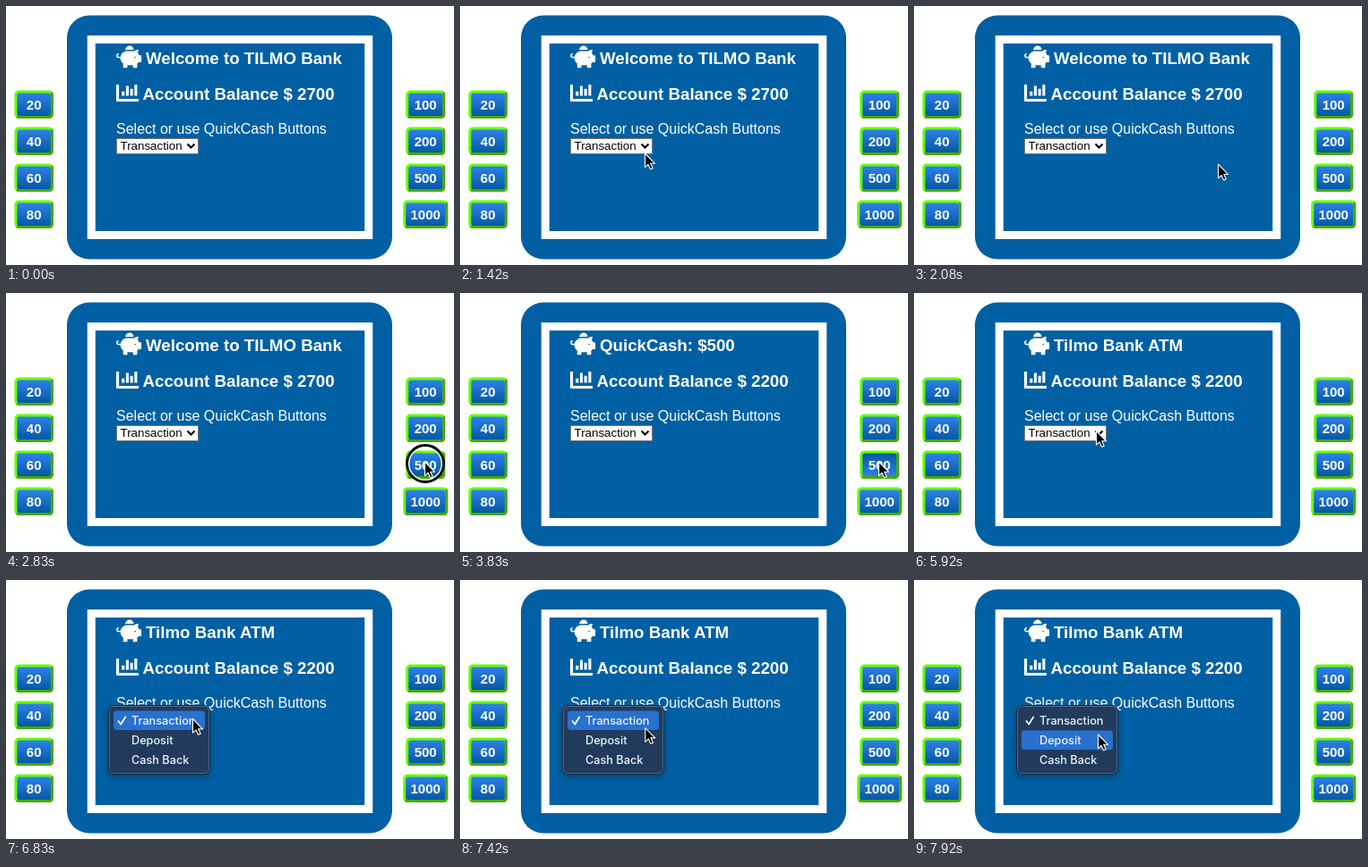
Animation, 500 px wide and 290 px high, one loop 8000 ms. Source, as an HTML page:

```html
<!DOCTYPE html>
<html lang="en">
<head>
<meta charset="utf-8">
<title>ATM demo</title>
<style>
  html, body { margin: 0; width: 100%; height: 100%; overflow: hidden; background: #fff; }
  svg { display: block; width: 500px; height: 290px; font-family: "Liberation Sans", Arial, sans-serif; }
  .head { font-size: 18.72px; font-weight: bold; fill: #fff; }
  .key { font-size: 15px; font-weight: bold; fill: #fff; text-anchor: middle; }
  .item { font: 500 12.7px Inter, sans-serif; fill: #eef2f7; }
</style>
</head>
<body>
<svg viewBox="0 0 500 290" xmlns="http://www.w3.org/2000/svg">
  <defs>
    <linearGradient id="up" x2="0" y2="1"><stop stop-color="#2f80ed"/><stop offset="1" stop-color="#0459a2"/></linearGradient>
    <linearGradient id="over" x2="0" y2="1"><stop stop-color="#0459a2"/><stop offset="1" stop-color="#2f80ed"/></linearGradient>
    <filter id="shade" x="-20%" y="-20%" width="140%" height="150%">
      <feDropShadow dx="0" dy="3" stdDeviation="4" flood-opacity=".3"/>
    </filter>
  </defs>
  <rect width="500" height="290" fill="#fff"/>
  <rect x="68" y="10.5" width="363" height="273" rx="25" fill="#0060a3"/>
  <rect x="95.25" y="37.5" width="309.5" height="219" fill="none" stroke="#fff" stroke-width="9"/>

  <g transform="translate(123 44.3) scale(.0488)" fill="#fff">
    <path d="M560 224h-30q-13-30-37-52l19-76h-32q-45 0-73 34-11-2-23-2H256c-77 0-142 55-157 128q-3 16-3 32c0 52 25 98 64 127v81q0 16 16 16h64q16 0 16-16v-48h128v48q0 16 16 16h64q16 0 16-16v-81q18-13 31-31h49q16 0 16-16V240q0-16-16-16z"/>
    <path d="M208 102a96 96 0 0 1 192-5q-8-1-16-1H256q-24 0-48 6z"/>
    <path d="M104 272H56c-52 0-52-80 2-80" fill="none" stroke="#fff" stroke-width="32"/>
    <circle cx="432" cy="272" r="16" fill="#0060a3"/>
  </g>
  <path d="M123 88h3.1v15.9H148v3.1H124q-1 0-1-1zM129.2 95.8h3.1v4.7h-3.1zM133.9 89.6h3.1v10.9h-3.1zM138.6 92.7h3.1v7.8h-3.1zM143.3 88h3.1v12.5h-3.1z" fill="#fff"/>

  <text id="title" class="head" x="156" y="65"></text>
  <text id="balance" class="head" x="152.5" y="105"></text>
  <text x="123" y="143" font-size="16" fill="#fff">Select or use QuickCash Buttons</text>

  <g id="select">
    <rect x="123.5" y="148.5" width="91" height="17" fill="#fff" stroke="#767676"/>
    <text x="127.5" y="161" font-size="13.33">Transaction</text>
    <path d="M202.5 154.5l4 4 4-4" fill="none" stroke="#000" stroke-width="2"/>
  </g>
  <g id="keys"></g>

  <g id="menu">
    <rect x="114.5" y="140.5" width="113" height="77" rx="6" fill="#233b5b" stroke="#16283f" filter="url(#shade)"/>
    <rect x="115.5" y="141.5" width="111" height="75" rx="5" fill="none" stroke="#56697f"/>
    <rect id="bar" x="120" width="102" height="21.5" rx="4" fill="#2871cf"/>
    <path d="M125.5 158l2.7 3.5 5-8" fill="none" stroke="#fff" stroke-width="1.7" stroke-linecap="round" stroke-linejoin="round"/>
    <text class="item" x="140" y="162">Transaction</text>
    <text class="item" x="140" y="184">Deposit</text>
    <text class="item" x="140" y="206">Cash Back</text>
  </g>

  <g id="ring" fill="none">
    <circle r="18.4" stroke="#fff" stroke-width="1.6"/>
    <circle r="20.5" stroke="#000" stroke-width="2.8"/>
  </g>
  <path id="cursor" d="M0 0V15.6L3.5 12.3 6 17.8 8.6 16.7 6.2 11.3H11z" stroke="#fff" stroke-width="1.1" stroke-linejoin="round"/>
</svg>
<script>
const $ = id => document.getElementById(id);
const LOOP = 8000, PAID = 2920, RESET = 4880, OPEN = 6500;
const CLICKS = [[2670, PAID], [6250, OPEN]];

// Pointer stops: time, x, y
const PATH = [
  [250, 502, 285], [1150, 206.5, 165], [1700, 206.5, 165], [2450, 467.5, 189],
  [4350, 467.5, 189], [5350, 203.5, 154.5], [6200, 203.5, 154.5],
  [6600, 208.5, 155.5], [7200, 208.5, 155.5], [7600, 205.5, 173]
];

function key(label, cx, w, row) {
  const x = cx - w / 2, y = 94.5 + row * 41, r = x + w, b = y + 31.5;
  return `<rect x="${x}" y="${y}" width="${w}" height="31.5" rx="5" fill="#66ff00"/>
    <path d="M${x + 1.5} ${b - 1.5}l3-3H${r - 3}V${y + 3}l1.5-1.5q1.5 1 1.5 3.5V${b - 5}q0 5-5 5H${x + 5}q-2 0-3.5-1.5z" fill="#47a900"/>
    <rect id="k${label}" x="${x + 3}" y="${y + 3}" width="${w - 6}" height="25.5" rx="2.5" fill="url(#up)"/>
    <text class="key" x="${cx}" y="${y + 21.3}">${label}</text>`;
}
$('keys').innerHTML =
  [20, 40, 60, 80].map((n, i) => key(n, 31.2, 43.5, i)).join('') +
  [100, 200, 500, 1000].map((n, i) => key(n, 468.2, n < 1000 ? 44 : 50, i)).join('');

const ease = u => u * u * (3 - 2 * u);
const show = (id, on) => $(id).setAttribute('visibility', on ? 'visible' : 'hidden');
const move = (id, x, y) => $(id).setAttribute('transform', `translate(${x} ${y})`);

function pointer(t) {
  const i = PATH.findIndex(p => p[0] > t);
  if (i < 0) return PATH[PATH.length - 1].slice(1);
  if (!i) return PATH[0].slice(1);
  const [t0, x0, y0] = PATH[i - 1], [t1, x1, y1] = PATH[i];
  const u = ease((t - t0) / (t1 - t0));
  return [x0 + (x1 - x0) * u, y0 + (y1 - y0) * u];
}

function draw(t) {
  const [x, y] = pointer(t);
  const pressed = CLICKS.some(([a, b]) => t >= a && t < b);
  const over = x > 446 && x < 490 && y > 177 && y < 208;

  $('title').textContent = t < PAID ? 'Welcome to TILMO Bank'
    : t < RESET ? 'QuickCash: $500' : 'Tilmo Bank ATM';
  $('balance').textContent = 'Account Balance $ ' + (t < PAID ? 2700 : 2200);
  $('k500').setAttribute('fill', over && !pressed ? 'url(#over)' : 'url(#up)');

  show('select', t < OPEN);
  show('menu', t >= OPEN);
  $('bar').setAttribute('y', y < 168.5 ? 146.5 : 168.5);

  show('cursor', t > PATH[0][0]);
  move('cursor', x, y);
  show('ring', pressed);
  move('ring', x + .5, y + 2);
}

let start;
function tick(now) {
  start ??= now;
  draw((now - start) % LOOP);
  requestAnimationFrame(tick);
}
draw(0);
requestAnimationFrame(tick);
</script>
</body>
</html>
```
